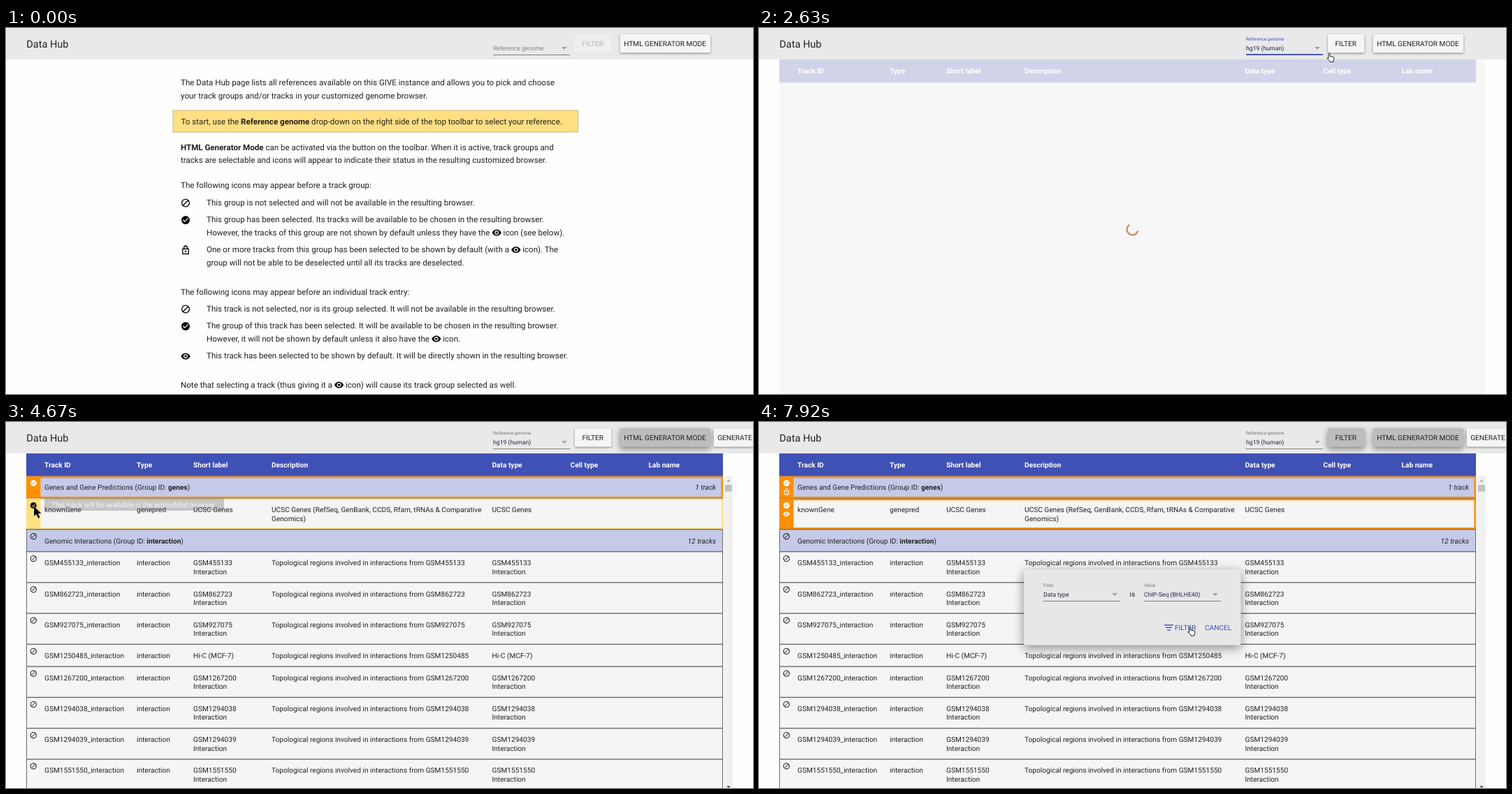
An HTML page with a canvas that plays this animation: 1069 by 524 pixels, repeating every 8000 ms.

```html
<!DOCTYPE html>
<html lang="en">
<head>
<meta charset="utf-8">
<title>Data Hub</title>
<style>
  html, body { margin: 0; width: 100%; height: 100%; overflow: hidden; background: #fefefe; }
  canvas { display: block; }
</style>
</head>
<body>
<canvas id="stage" width="1069" height="524"></canvas>
<script>
const c = document.getElementById('stage').getContext('2d');
c.textRendering = 'geometricPrecision';
const LOOP = 8000, FIRST = 390, STEP = 203;
const INK = '#212121', INDIGO = '#3f51b5', ORANGE = '#ff8f00', AMBER = '#ffe082', RULE = '#6c6c70';
const SMALL = 6.52, FIELD = 8.69, CELL = 10.14, BODY = 11.59, TITLE = 14.49;

function rect(x, y, w, h, color) {
  c.fillStyle = color;
  c.fillRect(x, y, w, h);
}

function card(x, y, w, h, color, blur = 0, drop = 1) {
  c.save();
  if (blur) {
    c.shadowColor = 'rgba(0,0,0,.45)';
    c.shadowBlur = blur;
    c.shadowOffsetY = drop;
  }
  c.fillStyle = color;
  c.beginPath();
  c.roundRect(x, y, w, h, 2);
  c.fill();
  c.restore();
}

function withAlpha(alpha, paint) {
  c.save();
  c.globalAlpha = alpha;
  paint();
  c.restore();
}

// y is the middle of the capitals; style is a CSS font prefix
function text(str, x, y, size = CELL, color = INK, style = '', align = 'left') {
  c.font = `${style} ${size}px Roboto, sans-serif`;
  c.textAlign = align;
  c.fillStyle = color;
  c.fillText(str, x, y + size * .355);
  return c.measureText(str).width;
}

// * toggles bold, @ is an inline eye icon
function rich(str, x, y, size = BODY) {
  let bold = false;
  for (const part of str.split(/([*@])/)) {
    if (part === '*') bold = !bold;
    else if (part === '@') { icon('eye', x + 7, y + .5, .6); x += 13.5; }
    else x += text(part, x, y, size, INK, bold ? 'bold' : '');
  }
}

// Icons live on a 24-unit grid centred on (x, y)
function icon(kind, x, y, scale, color = '#000', hole = '#fff') {
  c.save();
  c.translate(x, y);
  c.scale(scale, scale);
  c.fillStyle = c.strokeStyle = color;
  c.lineWidth = 2.2;
  const circle = r => { c.beginPath(); c.arc(0, 0, r, 0, 7); };
  if (kind === 'block') {
    circle(9);
    c.moveTo(-6.3, 6.3);
    c.lineTo(6.3, -6.3);
    c.stroke();
  } else if (kind === 'check') {
    circle(10);
    c.fill();
    c.strokeStyle = hole;
    c.beginPath();
    c.moveTo(-6, -.5); c.lineTo(-2, 3.5); c.lineTo(6.3, -4.8);
    c.stroke();
  } else if (kind === 'lock') {
    c.strokeRect(-7, -3, 14, 12);
    c.beginPath();
    c.moveTo(-4, -3); c.arc(0, -6, 4, Math.PI, 0); c.lineTo(4, -3);
    c.stroke();
    c.beginPath(); c.arc(0, 3, 2, 0, 7); c.fill();
  } else {
    c.beginPath();
    c.moveTo(-11, 0);
    c.bezierCurveTo(-7, -10, 7, -10, 11, 0);
    c.bezierCurveTo(7, 10, -7, 10, -11, 0);
    c.fill();
    c.fillStyle = hole; circle(5); c.fill();
    c.fillStyle = color; circle(3); c.fill();
  }
  c.restore();
}

function triangle(x, y, w, h, color) {
  c.fillStyle = color;
  c.beginPath();
  c.moveTo(x - w, y); c.lineTo(x + w, y); c.lineTo(x, y + h);
  c.fill();
}

function select(x, y, label, value, focused) {
  if (value) {
    text(label, x, y - 12.5, SMALL, focused ? INDIGO : '#757575');
    text(value, x, y, FIELD, '#25254a');
  } else text(label, x, y, FIELD, '#808080');
  if (focused) rect(x, y + 8.7, 110, 1.8, '#3949ab');
  else rect(x, y + 9.5, 110, 1, '#808080');
  triangle(x + 102, y - 1.5, 3.8, 4, '#a0a0a0');
}

function button(label, x, w, mode) {
  const [fill, color, blur] = {
    off: ['#efefef', '#b4b4b4', 0],
    on: ['#f5f5f5', INK, 3],
    active: ['#bdbdbd', INK, 9],
  }[mode];
  card(x, 9, w, 26.5, fill, blur, blur / 3);
  text(label, x + (w > 53 ? 5.5 : 10.5), 22.5, CELL, color);
}

function menu(x, y, w, h, items, chosen, scroll = 0, alpha = 1) {
  withAlpha(alpha, () => {
    card(x, y, w, h, '#f2f2f2', 9, 2);
    c.beginPath();
    c.rect(x, y, w, h);
    c.clip();
    items.forEach((item, i) => {
      const top = y + 2.6 + i * 34.8 - scroll;
      if (i === chosen) rect(x, top, w, 34.8, '#bdbdbd');
      text(item, x + 11.6, top + 17.4, BODY);
    });
  });
}

const GENOMES = ['hg19(human)', 'mm9(mouse)', 'hg38(human)', 'mm10(mouse)'];
const FIELDS = ['Data type', 'Cell type', 'Lab name'];
const SAMPLES = ['GSM455133', 'GSM862723', 'GSM927075', 'GSM1250485',
  'GSM1267200', 'GSM1294038', 'GSM1294039', 'GSM1551550'];
const TYPES = ['UCSC Genes', 'Hi-C (MCF-7)', ...SAMPLES.map(s => s + ' Interaction'),
  ...['ATF3', 'BATF', 'BCL3', 'BHLHE40', 'CEBPB', 'CTCF', 'EGR1', 'ELF1', 'ETS1']
    .map(s => `ChIP-Seq (${s})`)];
const COLUMNS = [55, 187, 268, 380, 695.5, 807.5, 919.5];
const HEADINGS = ['Track ID', 'Type', 'Short label', 'Description', 'Data type', 'Cell type', 'Lab name'];

const ROWS = [
  { group: 'Genes and Gene Predictions (Group ID: *genes*)', count: '1 track' },
  { cells: ['knownGene', 'genepred', 'UCSC Genes',
    'UCSC Genes (RefSeq, GenBank, CCDS, Rfam, tRNAs & Comparative|Genomics)', 'UCSC Genes'] },
  { group: 'Genomic Interactions (Group ID: *interaction*)', count: '12 tracks' },
  ...SAMPLES.map((s, i) => {
    const label = i === 3 ? 'Hi-C (MCF-7)' : s + '|Interaction';
    return { cells: [s + '_interaction', 'interaction', label,
      'Topological regions involved in interactions from ' + s, label] };
  }),
];

const GUIDE = [
  [250, 78, 'The Data Hub page lists all references available on this GIVE instance and allows you to pick and choose'],
  [250, 97, 'your track groups and/or tracks in your customized genome browser.'],
  [250.5, 133.5, 'To start, use the *Reference genome* drop-down on the right side of the top toolbar to select your reference.'],
  [250, 170.5, '*HTML Generator Mode* can be activated via the button on the toolbar. When it is active, track groups and'],
  [250, 189, 'tracks are selectable and icons will appear to indicate their status in the resulting customized browser.'],
  [250, 225, 'The following icons may appear before a track group:'],
  [287, 249.5, 'This group is not selected and will not be available in the resulting browser.', 'block'],
  [287, 274, 'This group has been selected. Its tracks will be available to be chosen in the resulting browser.', 'check'],
  [287, 292.5, 'However, the tracks of this group are not shown by default unless they have the @ icon (see below).'],
  [287, 317, 'One or more tracks from this group has been selected to be shown by default (with a @ icon). The', 'lock'],
  [287, 335.5, 'group will not be able to be deselected until all its tracks are deselected.'],
  [250, 377.5, 'The following icons may appear before an individual track entry:'],
  [287, 401.5, 'This track is not selected, nor is its group selected. It will not be available in the resulting browser.', 'block'],
  [287, 426, 'The group of this track has been selected. It will be available to be chosen in the resulting browser.', 'check'],
  [287, 444.5, 'However, it will not be shown by default unless it also have the @ icon.'],
  [287, 469, 'This track has been selected to be shown by default. It will be directly shown in the resulting browser.', 'eye'],
  [250, 510.5, 'Note that selecting a track (thus giving it a @ icon) will cause its track group selected as well.'],
];

function guide() {
  rect(238.5, 117.5, 580.5, 32, '#c9b787');
  rect(239.5, 118.5, 578.5, 30, AMBER);
  for (const [x, y, str, mark] of GUIDE) {
    rich(str, x, y);
    if (mark) icon(mark, 257, y + 1, .6);
  }
}

function headings(color) {
  rect(29, 45, 997, 32.5, color);
  HEADINGS.forEach((h, i) => text(h, COLUMNS[i], 61.5, CELL, '#fff', 'bold'));
}

function loading(n) {
  rect(29, 45, 1011, 479, '#f7f7f7');
  rect(29, 77, 997, 1.5, '#e6e6ec');
  headings('#d1d4e9');
  const turn = (n - 12) * 1.9;
  c.strokeStyle = '#c98a63';
  c.lineWidth = 2.2;
  c.beginPath();
  c.arc(534.5, 288.3, 8, turn + .25, turn + 4.1);
  c.stroke();
}

function table(modeOn, picked, shown) {
  rect(29, 77, 1011, 447, '#f5f5f5');
  let y = 77.6;
  ROWS.forEach((row, i) => {
    const tall = row.cells && row.cells.some(s => s.includes('|'));
    const h = tall ? 44.2 : 31.9;
    rect(29, y, 997, h, row.group ? '#c5cae9' : '#f5f5f5');
    rect(29, y, 1, h, RULE);
    rect(1025, y, 1, h, RULE);
    if (row.group) {
      rich(row.group, 55, y + 16.3, CELL);
      text(row.count, 1016, y + 16.3, CELL, INK, 'italic', 'right');
    } else row.cells.forEach((cell, k) =>
      cell.split('|').forEach((line, j) => text(line, COLUMNS[k], y + 16.2 + j * 12.3)));
    if (i) rect(29, y - .7, 997, 1.4, RULE);

    if (picked && i < 2) {
      const main = i === 0 || shown;
      const color = main ? ORANGE : AMBER;
      const ink = main ? '#fff' : '#000';
      const edge = main ? 2.6 : 2;
      rect(29, y, 20.5, h, color);
      c.strokeStyle = color;
      c.lineWidth = edge;
      c.strokeRect(29 + edge / 2, y + edge / 2, 997 - edge, h - edge);
      icon('check', 39.3, y + 10, .45, ink, color);
      if (shown) icon(i ? 'eye' : 'lock', 39.3, y + 22.3, .45, '#fff', color);
    } else if (modeOn) icon('block', 39.3, y + 10, .45);
    y += h;
  });
  rect(1028, 78, 12, 446, '#f1f1f1');
  rect(1029, 90, 10, 9.5, '#c1c1c1');
  triangle(1034, 85.5, 2.8, -3, '#a3a3a3');
  triangle(1034, 521, 2.8, 3, '#505050');
  headings(INDIGO);
}

function tooltip() {
  withAlpha(.32, () => card(55, 109.5, 257, 17.5, '#616161'));
  withAlpha(.85, () => text('This track will be available in the embedded browser', 65, 118.5, CELL, '#fff'));
}

function dialog(field, value) {
  card(379, 211, 310.5, 108.5, '#e7e7e7', 15, 4);
  select(407, 246.5, 'Field', field);
  text('is', 530.5, 246);
  select(551, 246.5, 'Value', value);
  const color = value ? INDIGO : '#b0b0b0';
  if (!value) card(571.5, 279, 60, 31, '#eeeeee');
  [0, 1, 2].forEach(i => rect(580 + i * 2.1, 290 + i * 3.6, 13 - i * 4.2, 1.4, color));
  text('FILTER', 595, 294.5, CELL, color);
  text('CANCEL', 638, 294.5, CELL, INDIGO);
}

// Pointer keys: step, shape, x, y
const POINTER = [
  [1, 'arrow', 975, 60], [2, 'arrow', 870, 45], [3, 'hand', 800, 30], [5, 'hand', 785, 32],
  [7, 'beam', 753, 71], [8, 'hand', 765, 55], [12, 'hand', 814, 35.5], [13, 'hand', 900, 26],
  [14, 'hand', 940, 26], [15, 'arrow', 400, 90], [16, 'arrow', 36.5, 123.5], [17, 'arrow', 12, 128],
  [18, 'arrow', 32, 121], [22, 'arrow', 40, 120.5], [23, 'hand', 838, 24], [24, 'arrow', 490, 245],
  [25, 'hand', 480, 245], [27, 'arrow', 513, 252.5], [28, 'arrow', 600, 250], [29, 'hand', 640, 246],
  [31, 'hand', 610, 400], [35, 'hand', 640, 325], [36, 'hand', 642, 316], [38, 'hand', 615, 293],
];

function pointer(n) {
  const i = POINTER.findLastIndex(k => k[0] <= n);
  if (i < 0) return;
  const [from, kind, x, y] = POINTER[i];
  const [to, , nx, ny] = POINTER[i + 1] || [from + 1, kind, x, y];
  const p = (n - from) / (to - from);
  c.save();
  c.translate(x + (nx - x) * p, y + (ny - y) * p);
  c.lineJoin = 'round';
  c.lineWidth = 1;
  if (kind === 'arrow') {
    const arrow = new Path2D('M0 0V14.5L3.3 11.4 6 17.3 8.6 16.2 6 10.5H10.5Z');
    c.fillStyle = '#000';
    c.strokeStyle = '#fff';
    c.stroke(arrow);
    c.fill(arrow);
  } else if (kind === 'hand') {
    const hand = new Path2D('M1 8V1Q2 -1 3 1V5L8 6Q9 6 9 8L8 12V13H3V12L-1 8Q-1 6 1 8Z');
    c.fillStyle = '#fff';
    c.strokeStyle = '#222';
    c.fill(hand);
    c.stroke(hand);
  } else {
    c.strokeStyle = '#111';
    c.stroke(new Path2D('M-2.5 -6H2.5M.5 -6V6M-2.5 6H2.5'));
  }
  c.restore();
}

function draw(n) {
  const chosen = n >= 8, modeOn = n >= 14, picked = n >= 20, shown = n >= 23;
  rect(0, 0, 1069, 524, '#fefefe');
  if (!chosen) guide();
  else if (n < 13) loading(n);
  else table(modeOn, picked, shown);

  rect(0, 0, 1069, 45, '#e9e9e9');
  text('Data Hub', 29.3, 22.5, TITLE);
  select(697, 28.5, 'Reference genome', chosen && 'hg19 (human)', chosen && n < 14);
  button('FILTER', 814, 52.5, shown ? 'active' : chosen ? 'on' : 'off');
  button('HTML GENERATOR MODE', 878.7, 129.5, modeOn ? 'active' : 'on');
  if (modeOn) button('GENERATE', 1012.7, 90, picked ? 'on' : 'off');

  if (n >= 4 && n < 8) {
    const height = { 4: 80, 7: 129 }[n] || 148;
    menu(708, 12, 98, height, GENOMES, n === 7 ? 0 : -1, 0, n === 7 ? .72 : 1);
  }
  if (n === 21 || n === 22) tooltip();
  if (n >= 24) dialog(n >= 27 && 'Data type', n >= 36 && TYPES[13]);
  if (n === 25 || n === 26) menu(420, 232, 97, 112, FIELDS, n === 26 ? 0 : -1, 0, n === 26 ? .8 : 1);
  if (n >= 29 && n < 36) {
    const scroll = Math.min(Math.max(n - 31, 0) / 3, 1) * 380;
    menu(467, 232, 194, n === 29 ? 150 : 300, TYPES, n === 35 ? 13 : -1, scroll);
  }
  pointer(n);
}

// The screen updates in even steps, like a recording
function tick() {
  const t = performance.now() % LOOP;
  draw(t < FIRST ? 0 : Math.min(38, 1 + Math.floor((t - FIRST) / STEP)));
  requestAnimationFrame(tick);
}
tick();
</script>
</body>
</html>
```
